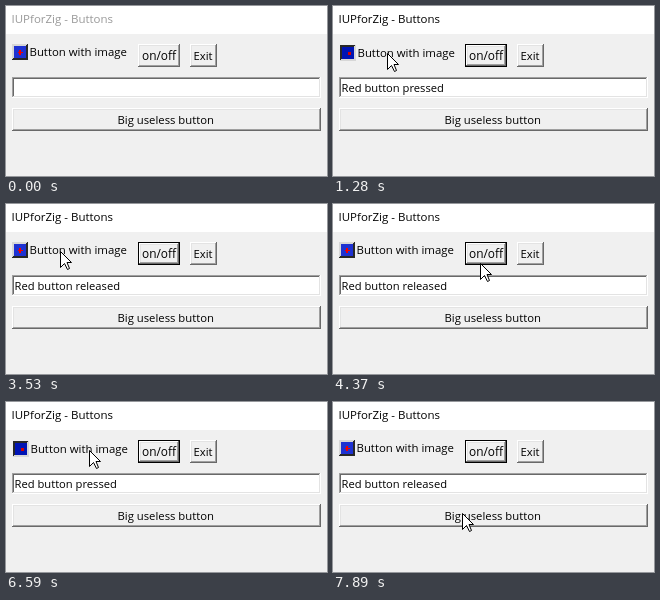
An HTML page with a canvas for the animation above (8 s loop, 321 px wide and 170 px high).

```html
<!DOCTYPE html>
<html lang="en">
<head>
<meta charset="utf-8">
<title>Buttons</title>
<style>
  html, body { margin: 0; width: 100%; height: 100%; overflow: hidden; background: #f0f0f0; }
  canvas { display: block; }
</style>
</head>
<body>
<canvas width="321" height="170"></canvas>
<script>
const ctx = document.querySelector('canvas').getContext('2d');
const LOOP = 8000;
const FACE = '#f0f0f0', WHITE = '#fff', LIGHT = '#e3e3e3', GREY = '#a0a0a0', DARK = '#696969';

// Pointer moves: start, end, number of hops, destination x, y
const START = [305, 153];
const MOVES = [
  [170, 550, 6, 11, 27],
  [690, 750, 2, 53, 51],
  [1060, 1060, 1, 54, 47],
  [3910, 4210, 5, 146, 59],
  [4370, 4370, 1, 147, 59],
  [4430, 4510, 2, 151, 51],
  [6060, 6360, 5, 83, 48],
  [7510, 7890, 6, 129, 111]
];
const IMAGE_CLICKS = [[1280, 1900], [2500, 2810], [3190, 3530], [6590, 6810], [7130, 7360]];
const TOGGLE_CLICKS = [[4580, 4740], [5750, 5910]];
const MESSAGE_DELAY = 70;

const within = (t, [from, to]) => t >= from && t < to;

function rect(color, x, y, w, h) {
  ctx.fillStyle = color;
  ctx.fillRect(x, y, w, h);
}

function text(string, x, y, size = 11.3, color = '#000') {
  ctx.font = `${size}px "Open Sans", "Noto Sans", sans-serif`;
  ctx.fillStyle = color;
  ctx.fillText(string, x, y);
}

// One-pixel frame: top and left in one colour, bottom and right in another
function edge(x, y, w, h, topLeft, bottomRight) {
  rect(topLeft, x, y, w, 1);
  rect(topLeft, x, y, 1, h);
  rect(bottomRight, x, y + h - 1, w, 1);
  rect(bottomRight, x + w - 1, y, 1, h);
}

function button(label, x, y, w, h, textX, { size, focused, pressed } = {}) {
  if (focused) {
    edge(x, y, w, h, '#000', '#000');
    x++; y++; w -= 2; h -= 2;
  }
  if (pressed) {
    edge(x, y, w, h, GREY, GREY);
  } else {
    edge(x, y, w, h, WHITE, DARK);
    edge(x + 1, y + 1, w - 2, h - 2, LIGHT, GREY);
  }
  const shift = pressed ? 1 : 0;
  text(label, textX + shift, y + (focused ? 15 : 16) + shift, size);
}

function imageButton(pressed, enabled) {
  const light = '#d7d7d7', dark = '#282828';
  ctx.save();
  ctx.beginPath();
  ctx.rect(6, 38, 116, 20);
  ctx.clip();
  if (pressed) ctx.translate(1, 1);
  for (const i of [0, 1]) {
    edge(6 + i, 38 + i, 16 - 2 * i, 16 - 2 * i, pressed ? dark : light, pressed ? light : dark);
  }
  rect(!enabled ? '#646464' : pressed ? '#0014b4' : '#1e32d2', 8, 40, 12, 12);
  if (!enabled) {
    rect('#c8c8c8', 13, 46, 3, 2);
  } else if (pressed) {
    rect('#d20000', 14, 45, 3, 3);
  } else {
    rect('#f00000', 13, 44, 2, 5);
    rect('#f00000', 12, 46, 5, 1);
  }
  text('Button with image', 23.5, 50, 11.4, enabled ? '#000' : '#6d6d6d');
  ctx.restore();
}

function pointerAt(t) {
  let [x, y] = START;
  for (const [from, to, hops, endX, endY] of MOVES) {
    if (t < from) break;
    const progress = to > from ? Math.min(1, (t - from) / (to - from)) : 1;
    const part = (1 + Math.floor(progress * (hops - 1) + 1e-6)) / hops;
    x += (endX - x) * part;
    y += (endY - y) * part;
  }
  return [Math.round(x), Math.round(y)];
}

function pointer(x, y) {
  ctx.save();
  ctx.translate(x + 0.5, y + 0.5);
  ctx.beginPath();
  ctx.moveTo(0, 0);
  for (const [px, py] of [[0, 16], [4, 12], [7, 18], [9, 17], [6.5, 11], [11, 11]]) ctx.lineTo(px, py);
  ctx.closePath();
  ctx.fillStyle = WHITE;
  ctx.fill();
  ctx.lineWidth = 1;
  ctx.strokeStyle = '#000';
  ctx.stroke();
  ctx.restore();
}

function message(t) {
  const last = IMAGE_CLICKS.length - 1;
  const shown = IMAGE_CLICKS.map(([from, to], i) => [from + (i === last ? MESSAGE_DELAY : 0), to]);
  if (t < shown[0][0]) return '';
  return 'Red button ' + (shown.some(span => within(t, span)) ? 'pressed' : 'released');
}

function draw(t) {
  const active = t >= IMAGE_CLICKS[0][0];
  const enabled = !within(t, [TOGGLE_CLICKS[0][1], TOGGLE_CLICKS[1][1]]);

  rect(FACE, 0, 0, 321, 170);
  rect(WHITE, 0, 0, 321, 28);
  text('IUPforZig - Buttons', 5.5, 17, 11.5, active ? '#000' : '#999');

  imageButton(IMAGE_CLICKS.some(span => within(t, span)), enabled);
  button('on/off', 132, 38, 42, 23, 136, {
    size: 11.9,
    focused: active,
    pressed: TOGGLE_CLICKS.some(span => within(t, span))
  });
  button('Exit', 184, 38, 27, 23, 187.5);

  rect(WHITE, 6, 71, 309, 21);
  edge(6, 71, 309, 21, GREY, WHITE);
  edge(7, 72, 307, 19, DARK, LIGHT);
  text(message(t), 8.5, 86, 11.2);

  button('Big useless button', 6, 102, 309, 23, 111.5);

  if (t >= MOVES[0][0]) pointer(...pointerAt(t));
}

const start = performance.now();
function tick() {
  draw((performance.now() - start) % LOOP);
  requestAnimationFrame(tick);
}
tick();
</script>
</body>
</html>
```
